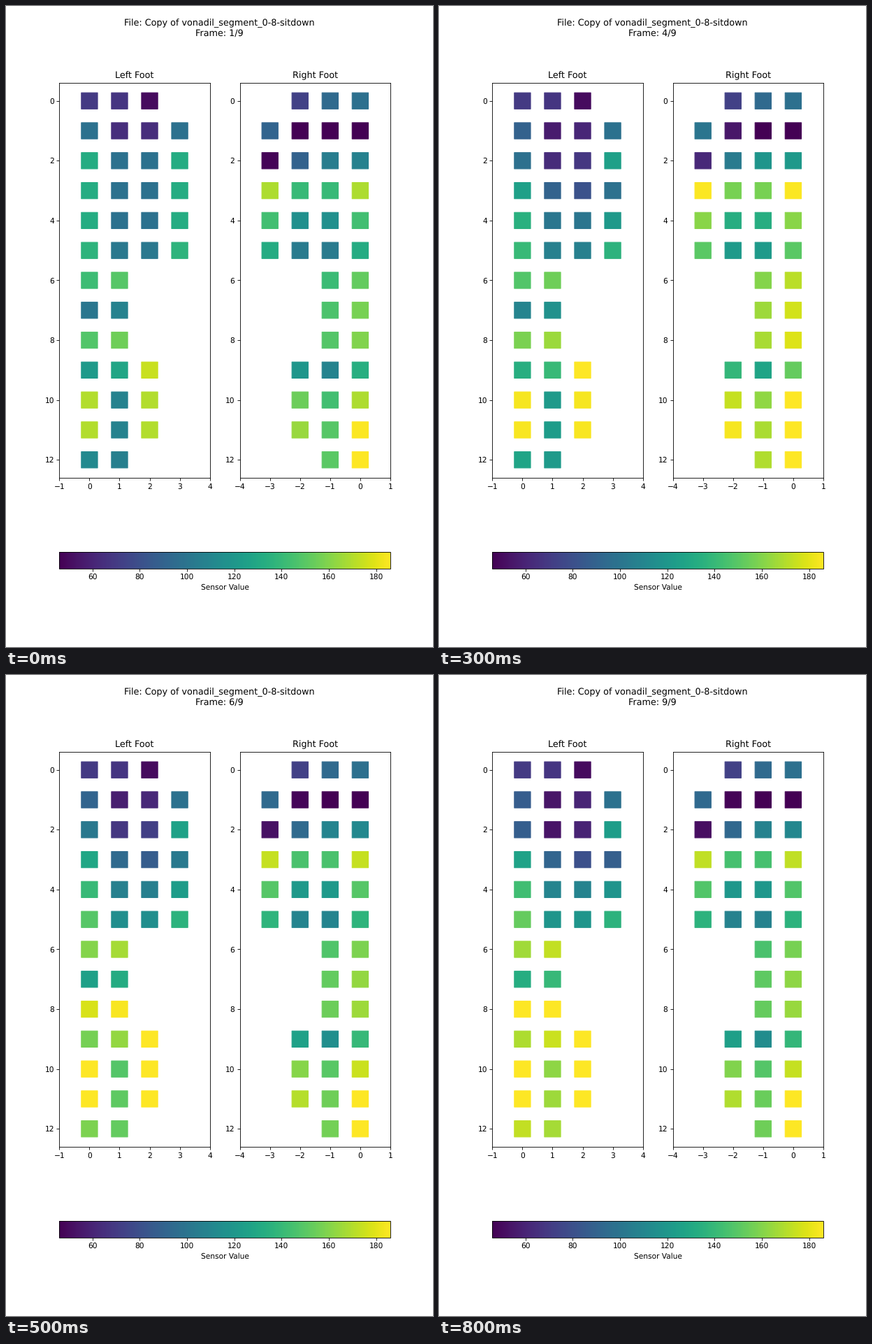
Animation of 611x917 px, one loop 900 ms. Source, as a matplotlib script:

```python
import numpy as np
import matplotlib.pyplot as plt
from matplotlib.animation import FuncAnimation

W, H, DPI = 611, 917, 76.375
FRAMES, STEP = 9, 100
VMIN, VMAX = 46, 186
ROWS = [3, 4, 4, 4, 4, 4, 2, 2, 2, 3, 3, 3, 2]  # sensors per row, toe to heel

row = np.repeat(np.arange(len(ROWS)), ROWS)
col = np.concatenate([np.arange(n) for n in ROWS])

# Resting pressure at the middle of each row.
LEFT_LEVEL = [70, 60, 94, 94, 94, 98, 149, 108, 155, 122, 108, 108, 106]
RIGHT_LEVEL = [97, 26, 107, 137, 112, 100, 141, 146, 148, 108, 143, 148, 149]

# Shape across the foot by band: first row, centre, strength, power.
LEFT_BANDS = [(0, 0, -2.5, 3), (1, 1.5, 17, 2), (6, 1, -7, 2),
              (9, 0, 6.5, 3), (10, 1, 62, 2), (12, 1, 6, 2)]
RIGHT_BANDS = [(0, 0, -3, 3), (1, 0, 2.4, 3), (2, 0, -2.2, 3),
               (3, 1.5, 14, 2), (6, 1.2, 8, 2), (9, 1.2, 18, 2),
               (11, 1.2, 26, 2)]

# Load over time, given at the key times and eased linearly between them.
KEYS = [0, 1, 2, 4, 6, 8]
HEEL_PRESS = [0, .45, .08, .4, 1, .93]
BALL_LIFT = [0, .2, 1, .4, .8, .9]
RIGHT_PRESS = [0, -.2, 1, .6, -.1, .2]


def rest(level, bands):
    values = np.array(level, float)[row]
    ends = [b[0] for b in bands[1:]] + [len(ROWS)]
    for (first, centre, strength, power), end in zip(bands, ends):
        band = (row >= first) & (row < end)
        values[band] += strength * np.abs(col[band] - centre) ** power
    return values


left_rest = rest(LEFT_LEVEL, LEFT_BANDS)
right_rest = rest(RIGHT_LEVEL, RIGHT_BANDS)

# How strongly each sensor answers to a load.
heel_gain = np.interp(row, [2, 5, 10, 12], [0, 18, 58, 66]) * (col < 3)
ball_gain = -50 * np.exp(-((row - 2 - col ** 3 / 25) / 0.85) ** 2)
right_gain = 24 * (1 - np.exp(-row / 1.5))


def left_values(t):
    press = np.interp(t, KEYS, HEEL_PRESS)
    lift = np.interp(t, KEYS, BALL_LIFT)
    return np.clip(left_rest + press * heel_gain + lift * ball_gain,
                   VMIN, VMAX)


def right_values(t):
    press = np.interp(t, KEYS, RIGHT_PRESS)
    return np.clip(right_rest + press * right_gain, VMIN, VMAX)


def draw_foot(ax, name, xs, values, first):
    dots = ax.scatter(xs, row, c=values, s=480, marker="s",
                      cmap="viridis", vmin=VMIN, vmax=VMAX, snap=False)
    ax.set_title(name)
    ax.set_xlim(first, first + 5)
    ax.set_xticks(range(first, first + 6))
    ax.set_ylim(12.6, -0.6)
    ax.set_yticks(range(0, 13, 2))
    return dots


plt.rcParams["text.hinting"] = "none"
fig, axes = plt.subplots(1, 2, figsize=((W + 1e-4) / DPI, (H + 1e-4) / DPI),
                         dpi=DPI)
left = draw_foot(axes[0], "Left Foot", col, left_values(0), -1)
right = draw_foot(axes[1], "Right Foot", -col, right_values(0), -4)

bar = fig.colorbar(left, ax=list(axes), orientation="horizontal",
                   fraction=0.05, pad=0.15, ticks=range(60, 181, 20))
bar.set_label("Sensor Value")
heading = fig.suptitle("")


def update(i):
    left.set_array(left_values(i))
    right.set_array(right_values(i))
    heading.set_text("File: Copy of vonadil_segment_0-8-sitdown\n"
                     f"Frame: {i + 1}/{FRAMES}")
    return left, right, heading


anim = FuncAnimation(fig, update, frames=FRAMES, interval=STEP,
                     repeat=True, repeat_delay=0)
plt.show()
```
